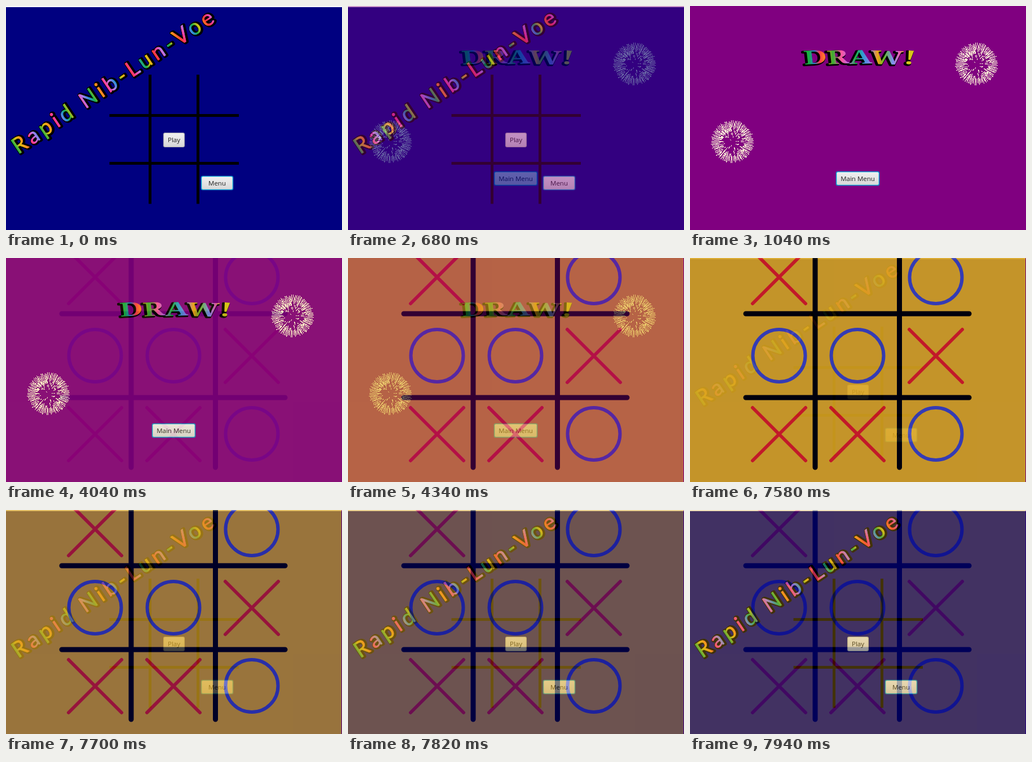
Write an HTML page that moves like this. It is 596 by 398 pixels and loops after 8 s.

```html
<!DOCTYPE html>
<html lang="en">
<head>
<meta charset="utf-8">
<title>Board game screens</title>
<style>
  html, body { margin: 0; width: 100%; height: 100%; overflow: hidden; background: #daa520; }
  svg { display: block; width: 100%; height: 100%; }

  /* Stacked menu > result > board; each cross-fade moves in 60 ms steps of 10%. */
  #menu { animation: menu 8s infinite; }
  #result { animation: result 8s infinite; }
  @keyframes menu {
    0% { opacity: 1; }
    6.25% { opacity: 1; animation-timing-function: steps(10, start); }
    13.75% { opacity: 0; }
    94.75% { opacity: 0; animation-timing-function: steps(7, start); }
    100% { opacity: .7; }
  }
  @keyframes result {
    0% { opacity: 1; }
    50.5% { opacity: 1; animation-timing-function: steps(10, start); }
    58%, 100% { opacity: 0; }
  }

  .line { fill: none; stroke: #000; }
  .thin { stroke-width: 5; }
  .thick { stroke-width: 9; stroke-linecap: round; }
  .cross { fill: none; stroke: #d81c20; stroke-width: 6; stroke-linecap: round; }
  .ring { fill: none; stroke: #3a42bb; stroke-width: 6; }
  .rays { fill: none; stroke: #fff8d8; stroke-width: 1; shape-rendering: crispEdges; }

  .title { font: 400 39px Lato, sans-serif; letter-spacing: 6.2px; }
  .draw { font: 900 34px "Noto Serif", serif; }
  .shade { fill: #000; stroke: #000; stroke-linejoin: round; }
  .title .shade { stroke-width: 6; }
  .draw .shade { stroke-width: 3; }
  .title .face { fill: url(#rainbow); stroke: url(#rainbow); stroke-width: .8; stroke-linejoin: round; }
  .draw .face { fill: url(#bands); }

  .label { font: 11.5px "Open Sans", sans-serif; fill: #222; text-anchor: middle; }
  .edge { fill: #b6b6b6; }
  .body { fill: url(#metal); }
  .focus .edge { fill: #039ed3; }
  .focus .glow { fill: #039ed3; opacity: .4; }
  .glow { fill: none; }
</style>
</head>
<body>
<svg viewBox="0 0 596 398" xmlns="http://www.w3.org/2000/svg">
  <defs>
    <linearGradient id="rainbow" gradientUnits="userSpaceOnUse" x1="3" x2="57.5" y1="0" y2="0" spreadMethod="repeat">
      <stop offset="0" stop-color="#18b04a"/>
      <stop offset=".16" stop-color="#d8c414"/>
      <stop offset=".3" stop-color="#ff9a1c"/>
      <stop offset=".45" stop-color="#ff3a3a"/>
      <stop offset=".58" stop-color="#ff3c9c"/>
      <stop offset=".74" stop-color="#b47cf0"/>
      <stop offset=".88" stop-color="#2a90dc"/>
      <stop offset="1" stop-color="#18b04a"/>
    </linearGradient>
    <linearGradient id="bands" gradientUnits="userSpaceOnUse" x1="0" x2="122" y1="0" y2="0">
      <stop offset=".04" stop-color="#18b040"/>
      <stop offset=".09" stop-color="#2a86d8"/>
      <stop offset=".14" stop-color="#ff3a4a"/>
      <stop offset=".19" stop-color="#ff8a1e"/>
      <stop offset=".26" stop-color="#38b030"/>
      <stop offset=".34" stop-color="#ff55a0"/>
      <stop offset=".4" stop-color="#b86ae0"/>
      <stop offset=".47" stop-color="#18b040"/>
      <stop offset=".53" stop-color="#2c9fd0"/>
      <stop offset=".6" stop-color="#8a7df0"/>
      <stop offset=".67" stop-color="#f0a018"/>
      <stop offset=".73" stop-color="#60b828"/>
      <stop offset=".81" stop-color="#7d90f5"/>
      <stop offset=".87" stop-color="#f060b0"/>
      <stop offset=".92" stop-color="#d8c81a"/>
    </linearGradient>
    <linearGradient id="metal" x1="0" x2="0" y1="0" y2="1">
      <stop offset="0" stop-color="#f0f0f0"/>
      <stop offset="1" stop-color="#d8d8d8"/>
    </linearGradient>
    <path id="x" class="cross" d="M-47-47 47 47M47-47-47 47"/>
    <circle id="o" class="ring" r="46.5"/>
    <path id="burst" class="rays"/>
  </defs>

  <g id="board">
    <rect width="596" height="398" fill="#daa520"/>
    <rect x="595" width="1" height="398" fill="#800080"/>
    <path class="line thick" d="M222-10V372M371.5-10V372M99 99H495M99 248H495"/>
    <use href="#x" x="158" y="34"/>
    <use href="#x" x="436" y="174"/>
    <use href="#x" x="158" y="313"/>
    <use href="#x" x="297" y="313"/>
    <use href="#o" x="436" y="34.5"/>
    <use href="#o" x="158" y="173.5"/>
    <use href="#o" x="297" y="173.5"/>
    <use href="#o" x="436" y="312.5"/>
  </g>

  <g id="result">
    <rect width="596" height="398" fill="#800080"/>
    <g class="draw" transform="translate(203 104) rotate(-.5) scale(1.59 1)">
      <text class="shade" x="-1.5" y="1.5" rotate="-4 -4 -2 3 8">DRAW!</text>
      <text class="face" rotate="-4 -4 -2 3 8">DRAW!</text>
    </g>
    <use href="#burst" x="508.5" y="103"/>
    <use href="#burst" x="75.5" y="241"/>
    <g class="focus" data-button="259 294 77 25 Main Menu"></g>
  </g>

  <g id="menu">
    <rect width="596" height="398" fill="#000080"/>
    <rect width="596" height="2" fill="#fff"/>
    <path class="line thin" d="M255.5 122V351.500M340.5 122V351.500M183.5 194.5H413M183.5 279.5H413"/>
    <g class="title" transform="translate(21.5 264) rotate(-34)">
      <text class="shade" x="1.5" y="1">Rapid Nib-Lun-Voe</text>
      <text class="face">Rapid Nib-Lun-Voe</text>
    </g>
    <g data-button="279 225 38 26 Play"></g>
    <g class="focus" data-button="346 302 57 25 Menu"></g>
  </g>
</svg>
<script>
  const NS = "http://www.w3.org/2000/svg";

  function add(parent, tag, attrs) {
    const el = document.createElementNS(NS, tag);
    for (const key in attrs) el.setAttribute(key, attrs[key]);
    return parent.appendChild(el);
  }

  function box(parent, name, x, y, width, height, rx) {
    add(parent, "rect", { class: name, x, y, width, height, rx });
  }

  for (const g of document.querySelectorAll("[data-button]")) {
    const [x, y, w, h, ...words] = g.dataset.button.split(" ");
    const [left, top, width, height] = [x, y, w, h].map(Number);
    box(g, "glow", left - .6, top - .6, width + 1.2, height + 1.2, 3.5);
    box(g, "edge", left, top, width, height, 3);
    box(g, "body", left + 1.3, top + 1.3, width - 2.6, height - 2.6, 2);
    const label = add(g, "text", { class: "label", x: left + width / 2, y: top + 17 });
    label.textContent = words.join(" ");
  }

  let seed = 7;
  function rand() {
    seed = (seed * 16807) % 2147483647;
    return seed / 2147483647;
  }

  function ray(angle, from, to) {
    const at = r => (r * Math.cos(angle)).toFixed(1) + " " + (r * Math.sin(angle)).toFixed(1);
    return "M" + at(from) + "L" + at(to);
  }

  // Long rays form the rim, short flecks fill the core.
  const rays = 96;
  let path = "";
  for (let i = 0; i < rays; i++) {
    const angle = (i + rand() * .6) / rays * 2 * Math.PI;
    path += ray(angle, 17 + rand() * 10, 34 + rand() * 4.5);
    const r = 3 + 20 * Math.sqrt(rand());
    path += ray(rand() * 2 * Math.PI, r, r + 2 + rand() * 3);
  }
  document.getElementById("burst").setAttribute("d", path);
</script>
</body>
</html>
```
